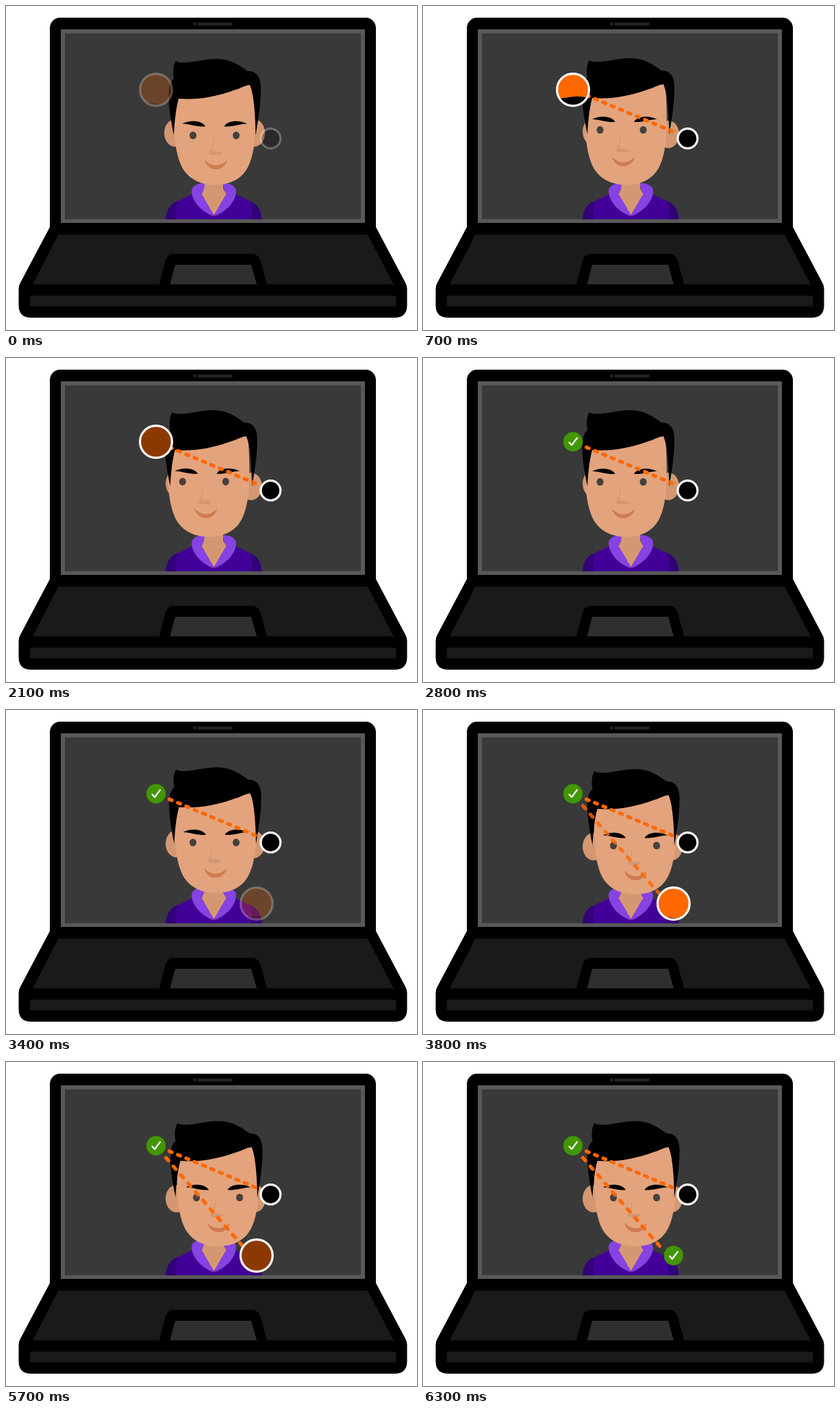
An HTML page with a canvas for the animation above (6.7 s loop, 600 by 472 pixels).

```html
<!DOCTYPE html>
<html lang="en">
<head>
<meta charset="utf-8">
<title>Face scan on a laptop</title>
<style>
html, body { margin: 0; width: 100%; height: 100%; overflow: hidden; background: #fff; }
canvas { display: block; width: 600px; height: 472px; }
</style>
</head>
<body>
<canvas id="stage" width="600" height="472"></canvas>
<script>
const ctx = document.getElementById('stage').getContext('2d');
const LOOP = 6700, STEP = 100, LAST = 6300;
const ORANGE = '#ff6800', SKIN = '#e3a37d', SHADE = '#d39872';

const clamp = v => Math.max(0, Math.min(1, v));
const ramp = (t, from, to) => clamp((t - from) / (to - from));
const ease = u => u * u * (3 - 2 * u);

function fill(path, color) {
  ctx.fillStyle = color;
  ctx.fill(new Path2D(path));
}
function box(x, y, w, h, color, radius = 0) {
  ctx.beginPath();
  ctx.roundRect(x, y, w, h, radius);
  ctx.fillStyle = color;
  ctx.fill();
}
function oval(x, y, rx, ry, color) {
  ctx.beginPath();
  ctx.ellipse(x, y, rx, ry, 0, 0, 7);
  ctx.fillStyle = color;
  ctx.fill();
}
const disc = (x, y, r, color) => oval(x, y, r, r, color);

function ring(x, y, r) {
  ctx.beginPath();
  ctx.arc(x, y, r, 0, 7);
  ctx.strokeStyle = '#fff';
  ctx.lineWidth = 3.2;
  ctx.stroke();
}

function drawLaptop() {
  box(64, 17, 476, 314, '#000', 15);
  fill('M64 318H540V322L583 403Q585.5 407 585.5 412V436Q585.5 454 567 454H37Q18.5 454 18.5 436V412Q18.5 407 21 403L64 322Z', '#000');
  disc(275.5, 26, 2.5, '#222');
  box(279, 24, 52, 4.5, '#222', 2.2);
  box(80, 34, 444, 282, '#595959');
  box(86, 40, 432, 270.5, '#393939');
  fill('M76.500 333H528L566 405.500H39Z', '#1a1a1a');
  fill('M223.500 407L232.500 372Q235 361 246 361H358Q369 361 372 372L381.500 407Z', '#000');
  fill('M247 377H358L366 405.500H239.500Z', '#2f2f2f');
  box(35, 422, 534, 15.5, '#1a1a1a');
}

function drawBody() {
  fill('M233 311C235 294 240 289 251 284L277 272H330L356 284C367 289 372 295 373.500 311Z', '#430098');
  fill('M233 311C235 295 240 289 251 284C247 292 249 302 249 311ZM373.500 311C372 295 367 289 356 284C361 293 358 302 358 311Z', '#310078');
  fill('M289 250H317V266L322 274L303.500 305L285 274L289 266Z', SHADE);
  const collar = 'M290 258C278 258 271 263 271 270C272 286 285 299 303.500 306.500C298 294 291 283 285.500 274C289 269 290 264 290 258Z';
  fill(collar, '#8742e2');
  ctx.save();
  ctx.translate(607, 0);
  ctx.scale(-1, 1);
  fill(collar, '#8742e2');
  ctx.restore();
}

// Each part has its own offset when the head looks left or down-right.
function drawHead(left, right) {
  const part = (lx, ly, rx, ry, draw) => {
    ctx.save();
    ctx.translate(lx * left + rx * right, ly * left + ry * right);
    draw();
    ctx.restore();
  };
  part(2, -2, 2, 14, () => oval(247, 185, 16, 20, SHADE));
  part(-4, 2, 1, 14, () => oval(362, 185, 16, 20, SHADE));
  part(-8.5, 0, 4.5, 8, () => fill('M247 122C243 180 246 213 257 235C267 253 285 260.500 305 260.500C327 260.500 344 252 353 235C364 213 367 180 362 108Z', SKIN));
  part(-5, -1, 2.5, 9, () => fill('M248 80C258 87 285 77 308 77C328 77 342 87 353 95C366 95 372 103 372 120C372 146 368 165 364.500 189C364 160 362 128 356 115C347 116 343 120 332 123C304 133 279 137 252 135C248 150 246 168 245 188C240 164 236 138 238 122C239 113 242 109 245 106C243 95 244 86 248 80Z', '#000'));
  part(-10.5, -6.5, 5, 11, () => {
    fill('M257.500 171.500C267 166 286 166 291 175.500C278 176 269 172 257.500 171.500ZM352 171.500C342 166 323 166 318.500 175.500C331 176 341 172 352 171.500Z', '#000');
  });
  part(-14.5, -8, 5, 9, () => {
    for (const x of [273, 336]) oval(x, 188.5, 5, 5.5, '#46403d');
  });
  part(-15, -4, 2, 9, () => {
    oval(306, 214.5, 10, 3, SHADE);
    fill('M304 185Q303 204 297 213.500L300 215Q304 205 304 185Z', SHADE);
  });
  part(-14, -4.5, 4, 10, () => fill('M290 224.500Q307 240 323 224.500C319 242 295 243 290 224.500Z', '#cf7b50'));
}

function dashed(x1, y1, x2, y2, dash, alpha) {
  ctx.save();
  ctx.globalAlpha = alpha;
  ctx.strokeStyle = ORANGE;
  ctx.lineWidth = 5.2;
  ctx.lineCap = 'round';
  ctx.setLineDash(dash);
  ctx.beginPath();
  ctx.moveTo(x1, y1);
  ctx.lineTo(x2, y2);
  ctx.stroke();
  ctx.restore();
}

function drawCheck(x, y, scale) {
  ctx.save();
  ctx.translate(x, y);
  disc(0, 0, 14.2, '#429600');
  ctx.scale(scale, scale);
  ctx.strokeStyle = '#fff';
  ctx.lineWidth = 2.2;
  ctx.lineCap = ctx.lineJoin = 'round';
  ctx.stroke(new Path2D('M-5.500 1L-2 5L6 -5.500'));
  ctx.restore();
}

// An orange timer that fills with black, flashes back, then shrinks to a check.
function drawMarker(x, y, age, alpha) {
  const shrink = ease(ramp(age, 2200, 2600));
  if (shrink === 1) return drawCheck(x, y, ramp(age, 2500, 2700));
  const r = 23.4 - 9.2 * shrink;
  ctx.save();
  ctx.globalAlpha = alpha;
  ctx.save();
  ctx.beginPath();
  ctx.arc(x, y, r, 0, 7);
  ctx.clip();
  box(x - 25, y - 25, 50, 50, ORANGE);
  const u = Math.max(0, age - 200);
  const level = 20 - 0.01065 * u - 0.0000147 * u * u;
  ctx.globalAlpha = alpha * (1 - ramp(age, 1880, 2280));
  ctx.beginPath();
  ctx.moveTo(x - 25, y + 26);
  for (let dx = -25; dx <= 25; dx++) {
    ctx.lineTo(x + dx, y + level + 1.2 * Math.sin(dx / 8 + age / 180));
  }
  ctx.lineTo(x + 25, y + 26);
  ctx.fillStyle = '#000';
  ctx.fill();
  ctx.globalAlpha = shrink;
  box(x - 25, y - 25, 50, 50, '#429600');
  ctx.restore();
  ctx.globalAlpha = alpha * (1 - shrink);
  ring(x, y, r);
  ctx.restore();
}

function render(t) {
  ctx.fillStyle = '#fff';
  ctx.fillRect(0, 0, 600, 472);
  drawLaptop();

  const turn = ease(ramp(t, 2800, 3700));
  const drift = 0.06 * Math.sin(Math.PI * ramp(t, 700, 2800));
  ctx.save();
  ctx.beginPath();
  ctx.rect(86, 40, 432, 270.5);
  ctx.clip();
  drawBody();
  drawHead((ease(ramp(t, 0, 650)) + drift) * (1 - turn), turn);
  ctx.restore();

  dashed(238.5, 130, 371, 185.5, [4, 9.2], ramp(t, 0, 500));
  dashed(233.5, 139.5, 347, 270, [5.5, 11], ramp(t, 3400, 3900));

  const appear = clamp(0.25 + t / 300);
  ctx.save();
  ctx.globalAlpha = appear;
  disc(386.3, 193, 13.2, '#000');
  ring(386.3, 193, 14.4);
  ctx.restore();

  drawMarker(219, 122, t, appear);
  if (t >= 3400) drawMarker(365.8, 282, t - 3600, clamp(0.25 + (t - 3400) / 400));
}

function tick(now) {
  render(Math.min(LAST, Math.floor((now % LOOP) / STEP) * STEP));
  requestAnimationFrame(tick);
}
render(0);
requestAnimationFrame(tick);
</script>
</body>
</html>
```
